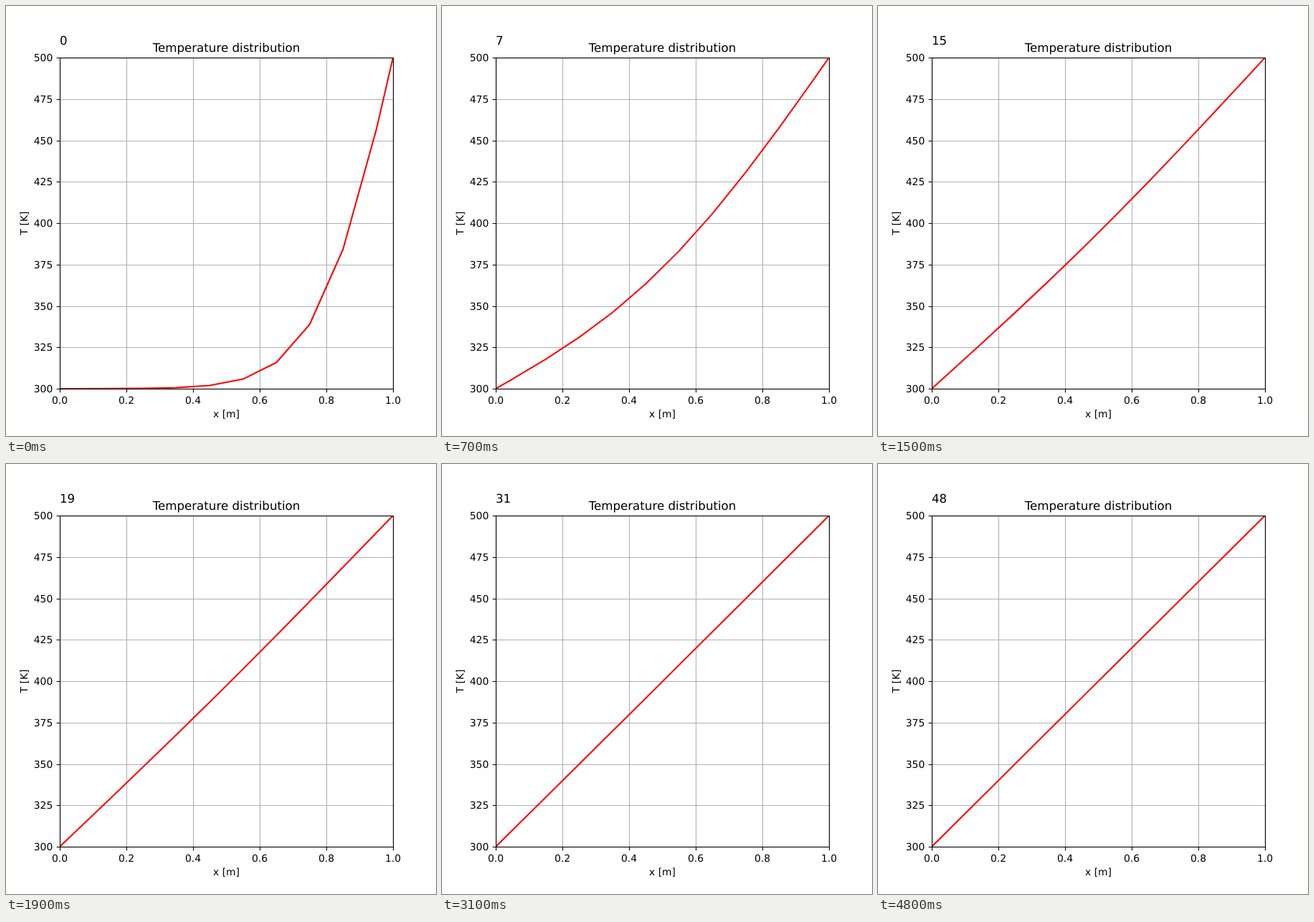
Animation, 600 px wide and 600 px high, one loop 4900 ms. Source, as an HTML page:

```html
<!DOCTYPE html>
<html lang="en">
<head>
<meta charset="utf-8">
<title>Temperature distribution</title>
<style>
  html, body { margin: 0; width: 100%; height: 100%; overflow: hidden; background: #fff; }
  svg { display: block; width: 600px; height: 600px; }
  text { font-family: "DejaVu Sans", sans-serif; font-size: 13.889px; text-rendering: geometricPrecision; }
  .large { font-size: 16.667px; }
  .middle { text-anchor: middle; }
  .end { text-anchor: end; }
  .grid { stroke: #b0b0b0; stroke-width: 1.11; }
  .axis { stroke: #000; stroke-width: 1.11; fill: none; }
  .curve { stroke: #f00; stroke-width: 2.083; fill: none; stroke-linejoin: round; stroke-linecap: square; }
</style>
</head>
<body>
<svg id="stage" viewBox="0 0 600 600">
  <defs><clipPath id="plot"><rect x="75" y="72" width="465" height="462"/></clipPath></defs>
</svg>
<script>
const LEFT = 75, RIGHT = 540, TOP = 72, BOTTOM = 534;
const FRAMES = 49, FRAME_MS = 100;
const CELLS = 10, COLD = 300, HOT = 500;
const RATE = 0.2, STEPS_PER_FRAME = 10;

const stage = document.getElementById("stage");

function add(tag, attrs, text = "") {
  const node = document.createElementNS("http://www.w3.org/2000/svg", tag);
  for (const key in attrs) node.setAttribute(key, attrs[key]);
  node.textContent = text;
  return stage.appendChild(node);
}

const label = (x, y, text, cls, extra = {}) => add("text", { x, y, class: cls, ...extra }, text);
const toX = x => LEFT + x * (RIGHT - LEFT);
const toY = t => BOTTOM - (t - COLD) / (HOT - COLD) * (BOTTOM - TOP);
const snap = v => Math.floor(v + 0.5) + 0.5;

// One implicit Euler step of the heat equation on cell centres (Thomas algorithm).
function diffuse(temps) {
  const upper = [], rhs = [];
  temps.forEach((t, i) => {
    const first = i === 0, last = i === CELLS - 1;
    const diagonal = 1 + RATE * (first || last ? 3 : 2);
    const source = t + (first ? 2 * RATE * COLD : 0) + (last ? 2 * RATE * HOT : 0);
    const pivot = diagonal + (first ? 0 : RATE * upper[i - 1]);
    upper[i] = last ? 0 : -RATE / pivot;
    rhs[i] = (source + (first ? 0 : RATE * rhs[i - 1])) / pivot;
  });
  for (let i = CELLS - 2; i >= 0; i--) rhs[i] -= upper[i] * rhs[i + 1];
  return rhs;
}

function curvePath(temps) {
  const nodes = [[0, COLD], ...temps.map((t, i) => [(i + 0.5) / CELLS, t]), [1, HOT]];
  return "M" + nodes.map(([x, t]) => `${toX(x).toFixed(2)},${toY(t).toFixed(2)}`).join("L");
}

function simulate() {
  const paths = [];
  let temps = Array(CELLS).fill(COLD);
  for (let n = 0; n < FRAMES; n++) {
    for (let s = 0; s < STEPS_PER_FRAME; s++) temps = diffuse(temps);
    paths.push(curvePath(temps));
  }
  return paths;
}

for (let i = 0; i <= 5; i++) {
  const x = snap(toX(i / 5));
  add("path", { class: "grid", d: `M${x},${TOP}V${BOTTOM}`, "clip-path": "url(#plot)" });
  add("path", { class: "axis", d: `M${x},${BOTTOM + 0.5}v4.86` });
  label(toX(i / 5), 555, (i / 5).toFixed(1), "middle");
}
for (let t = COLD; t <= HOT; t += 25) {
  const y = snap(toY(t));
  add("path", { class: "grid", d: `M${LEFT},${y}H${RIGHT}`, "clip-path": "url(#plot)" });
  add("path", { class: "axis", d: `M${LEFT + 0.5},${y}h-4.86` });
  label(65.28, Math.round(toY(t)) + 5, t, "end");
}

const curve = add("path", { class: "curve", "clip-path": "url(#plot)" });
add("rect", { class: "axis", x: LEFT + 0.5, y: TOP + 0.5, width: RIGHT - LEFT, height: BOTTOM - TOP });
label(307.5, 64, "Temperature distribution", "large middle");
label(307.5, 574, "x [m]", "middle");
label(0, 0, "T [K]", "middle", { transform: "translate(30 303) rotate(-90)" });
const counter = label(LEFT, 54, "0", "large");

const paths = simulate();
const start = performance.now();
let shown = -1;

function draw(now) {
  const frame = Math.floor(Math.max(0, now - start) / FRAME_MS) % FRAMES;
  if (frame !== shown) {
    shown = frame;
    curve.setAttribute("d", paths[frame]);
    counter.textContent = frame;
  }
  requestAnimationFrame(draw);
}
draw(start);
</script>
</body>
</html>
```
